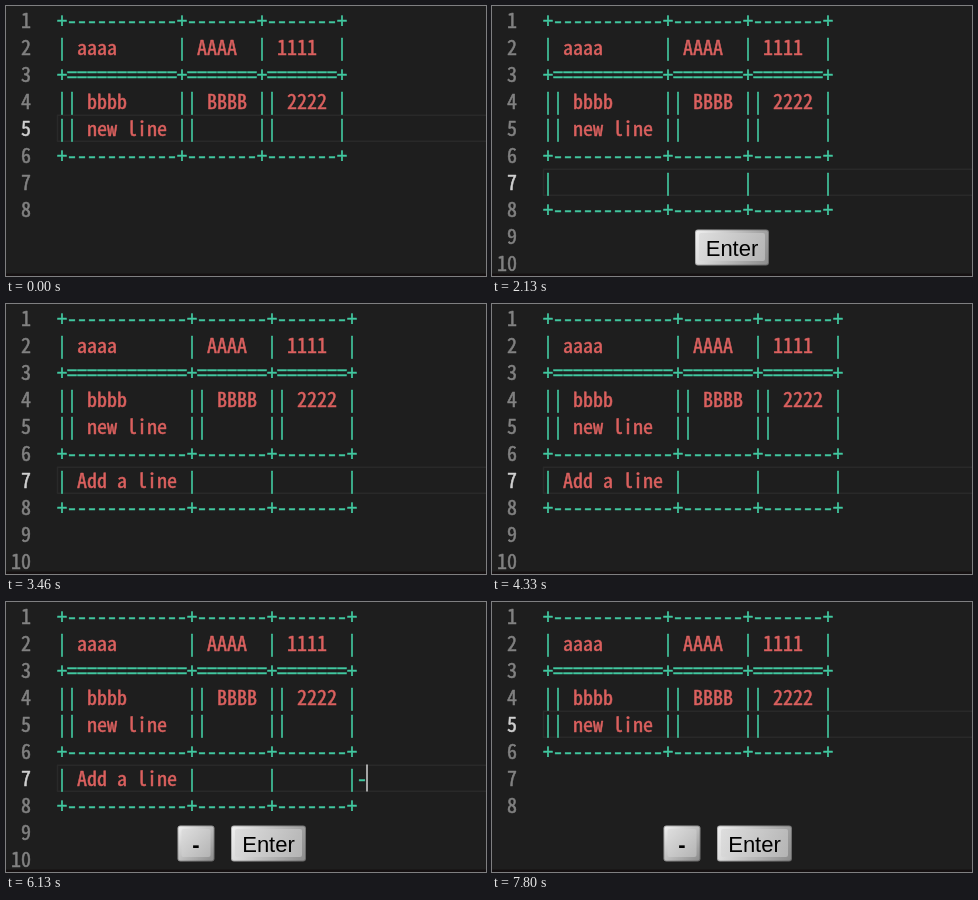
Recreate the animation shown at these times as an HTML page with a canvas. Size 480 by 270 pixels, loop 8 s.

```html
<!DOCTYPE html>
<html lang="en">
<head>
<meta charset="utf-8">
<title>Table editing</title>
<style>
  html, body { margin: 0; width: 100%; height: 100%; overflow: hidden; background: #1e1e1e; }
  canvas { display: block; width: 480px; height: 270px; }
</style>
</head>
<body>
<canvas id="stage" width="480" height="270"></canvas>
<script>
const ctx = document.getElementById('stage').getContext('2d');
const LOOP = 8000, TICK = 1000 / 15, BLINK = 500;
const CELL = 10, LINE = 27, LEFT = 51;
const GREEN = '#42c8a0', RED = '#dc615f';
const MONO = '20px "Noto Sans Mono CJK JP", "Noto Sans Mono CJK SC", "Noto Sans Mono", monospace';
const rowTop = row => 1 + LINE * (row - 1);

// Each edit changes part of the state and restarts the caret blink.
const edits = [
  { at: -670, row: 5, col: 29, firstWidth: 11, typed: '', tail: '', extraRow: false },
  { at: 1590, row: 7, col: 2, extraRow: true },
  { at: 2450, col: 12, typed: 'Add a line' },
  { at: 2930, firstWidth: 12 },
  { at: 3590 },
  { at: 3790, col: 30 },
  { at: 5130, col: 31, tail: '-' },
  { at: 6230, row: 6, col: 29, firstWidth: 11, extraRow: false },
  { at: 7130, row: 5 }
];
const stateAt = t => Object.assign({}, ...edits.filter(edit => edit.at <= t));

function tableLines({ firstWidth, typed, tail, extraRow }) {
  const widths = [firstWidth, 7, 7];
  const rule = ch => '+' + widths.map(w => ch.repeat(w) + '+').join('');
  const row = (...cells) => '|' + widths.map((w, i) => (cells[i] || '').padEnd(w) + '|').join('');
  const lines = [
    rule('-'), row(' aaaa', ' AAAA', ' 1111'), rule('='),
    row('| bbbb', '| BBBB', '| 2222'), row('| new line', '|', '|'), rule('-')
  ];
  if (!extraRow) return lines;
  const fitted = firstWidth > typed.length + 1;
  const added = fitted ? row(' ' + typed) : '| ' + typed + row().slice(2);
  return [...lines, added + tail, rule('-')];
}

function drawChars(text, x, row, color) {
  [...text].forEach((ch, i) => {
    ctx.fillStyle = ctx.strokeStyle = color || (/[-+=|]/.test(ch) ? GREEN : RED);
    const centre = x + CELL * (i + 0.5), base = rowTop(row) + 21;
    ctx.fillText(ch, centre, base);
    ctx.strokeText(ch, centre, base);
  });
}

function fillBox(x, y, w, h, radius, from, to) {
  const shade = ctx.createLinearGradient(x, y, x + w, y + h);
  shade.addColorStop(0, from);
  shade.addColorStop(1, to);
  ctx.fillStyle = shade;
  ctx.beginPath();
  ctx.roundRect(x, y, w, h, radius);
  ctx.fill();
}

function drawKey(x, width, label, weight = 'normal') {
  fillBox(x, 223.5, width, 36, 3, '#b5b5b5', '#666');
  fillBox(x + 1, 224.5, width - 2, 34, 2, '#f0f0f0', '#8c8c8c');
  fillBox(x + 4, 227, width - 8, 28, 2, '#dedede', '#b4b4b4');
  ctx.fillStyle = '#000';
  ctx.font = `${weight} 22px "Liberation Sans", Arial, sans-serif`;
  ctx.fillText(label, x + width / 2, 249.5);
}

function draw(t) {
  const state = stateAt(t);
  const lines = tableLines(state);
  const top = rowTop(state.row);
  ctx.fillStyle = '#1e1e1e';
  ctx.fillRect(0, 0, 480, 270);
  ctx.fillStyle = '#151011';
  ctx.fillRect(0, 267.5, 480, 2.5);

  ctx.strokeStyle = '#292929';
  ctx.lineWidth = 1.5;
  ctx.strokeRect(LEFT + 0.5, top + 0.2, 440, LINE - 1);

  ctx.font = MONO;
  ctx.textAlign = 'center';
  ctx.lineWidth = 0.5;
  ctx.lineJoin = 'round';
  for (let n = 1; n <= lines.length + 2; n++) {
    const label = String(n);
    drawChars(label, 25 - CELL * label.length, n, n === state.row ? '#d0d0d0' : '#828282');
  }
  lines.forEach((line, i) => drawChars(line, LEFT, i + 1));

  if (Math.floor((t - state.at) / BLINK) % 2 === 0) {
    ctx.fillStyle = '#c8c8c8';
    ctx.fillRect(LEFT + CELL * state.col - 0.8, top - 0.5, 1.6, LINE);
  }

  if (t > 990 && t < 2330) drawKey(203, 74, 'Enter');
  if (t > 4660 && t < 7060 || t > 7790) {
    drawKey(171.5, 37, '-', 'bold');
    drawKey(225, 75, 'Enter');
  }
}

function tick() {
  const now = performance.now() % LOOP;
  draw(Math.floor((now + 7) / TICK) * TICK);
  requestAnimationFrame(tick);
}
tick();
</script>
</body>
</html>
```
